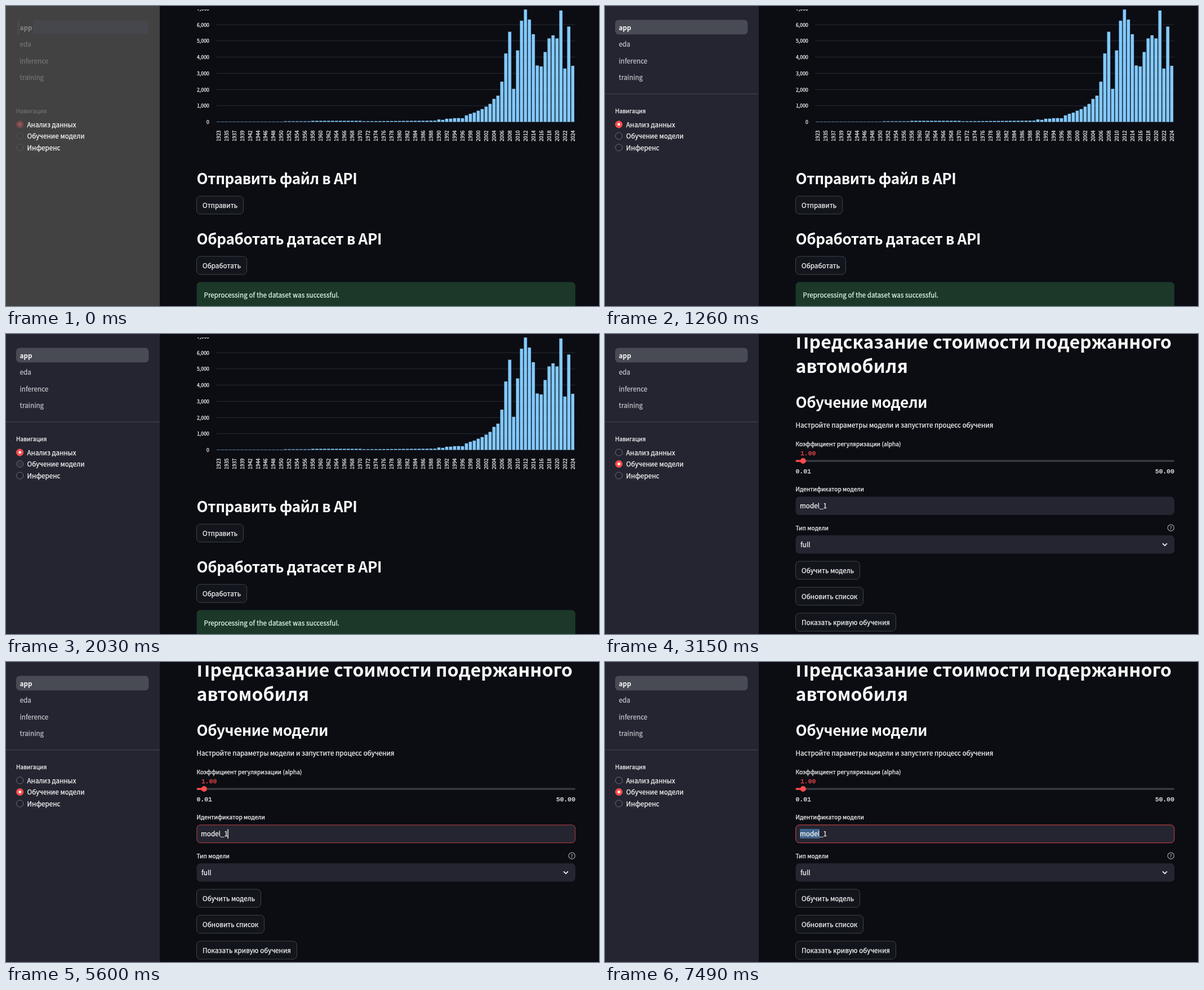
Animation, 1053 px wide and 532 px high, one loop 8000 ms. Source, as an HTML page:

```html
<!DOCTYPE html>
<html lang="en">
<head>
<meta charset="utf-8">
<title>Model dashboard</title>
<style>
html, body { margin: 0; width: 100%; height: 100%; overflow: hidden; background: #0b0d13; }
svg { display: block; width: 100vw; height: 100vh; }
text {
  font-family: "Noto Sans CJK JP", "Noto Sans CJK SC", "Noto Sans CJK", "Open Sans", sans-serif;
  color: #fafafa; fill: currentColor; stroke: currentColor; stroke-width: .25px;
  letter-spacing: .05px; white-space: pre;
}
.mono { font-family: "Liberation Mono", monospace; letter-spacing: 0; }
.h1 { font-weight: 700; letter-spacing: .08px; stroke: none; }
.h2 { font-weight: 600; letter-spacing: -.42px; stroke: none; }
.step { animation: 8s step-end infinite; }
.veil { animation-name: veil; }
.side { animation-name: side; }
.data { animation-name: data; }
.train { animation-name: train; }
.first { animation-name: first; }
.hover { animation-name: hover; }
.swap { animation-name: swap; }
.focus { animation-name: focus; }
.caret { animation-name: caret; }
.pick { animation-name: pick; }
@keyframes veil { 0% { opacity: 1 } 15.75%, 100% { opacity: 0 } }
@keyframes side { 0% { opacity: 0 } 15.75%, 100% { opacity: 1 } }
@keyframes data { 0% { opacity: 1 } 39.375%, 100% { opacity: 0 } }
@keyframes train { 0% { opacity: 0 } 39.375%, 100% { opacity: 1 } }
@keyframes first { 0% { opacity: 1 } 37.625%, 100% { opacity: 0 } }
@keyframes hover { 0% { opacity: 0 } 25.375% { opacity: 1 } 37.625%, 100% { opacity: 0 } }
@keyframes swap { 0% { opacity: 0 } 37.625% { opacity: 1 } 39.375%, 100% { opacity: 0 } }
@keyframes focus { 0% { opacity: 0 } 70% { opacity: .68 } 70.875% { opacity: .8 } 71.75%, 100% { opacity: .85 } }
@keyframes caret {
  0% { opacity: 0; transform: none }
  70% { opacity: 1 }
  77% { opacity: .7 } 77.875% { opacity: .3 } 78.75% { opacity: 0 }
  82.25% { opacity: .3 } 83.125% { opacity: .7 } 84% { opacity: 1; transform: none }
  89.25% { opacity: 1; transform: translateX(-13px) }
  91.875%, 100% { opacity: 0; transform: translateX(-13px) }
}
@keyframes pick {
  0% { opacity: 0; transform: none }
  91.875% { opacity: 1; transform: translateX(25px) }
  92.75% { opacity: 1; transform: translateX(10.8px) }
  93.625%, 100% { opacity: 1; transform: none }
}
</style>
</head>
<body>
<svg id="stage" viewBox="0 0 1053 532" preserveAspectRatio="none"></svg>
<script>
const BODY = 13, SMALL = 11.375, TICK = 9.75, H1 = 35.75, H2 = 29.25;
const CJK_SCALE = 1.117; // Latin letters of the CJK face run larger per em
const RED = '#ff4b4b', PANEL = '#242530', BG = '#0b0d13';

const text = (x, y, size, str, attrs = '') =>
  `<text x="${x}" y="${y}" font-size="${(size / CJK_SCALE).toFixed(3)}" ${attrs}>${str}</text>`;
const mono = (x, y, str, attrs = '') =>
  `<text class="mono" x="${x}" y="${y}" font-size="${SMALL}" ${attrs}>${str}</text>`;
const h1 = (y, str) => text(338.5, y, H1, str, 'class="h1"');
const h2 = (y, str) => text(338.5, y, H2, str, 'class="h2"');
const rect = (x, y, w, h, fill, attrs = '') =>
  `<rect x="${x}" y="${y}" width="${w}" height="${h}" fill="${fill}" ${attrs}/>`;
const disc = (y, r, fill, attrs = '') =>
  `<circle cx="24.6" cy="${y}" r="${r}" fill="${fill}" ${attrs}/>`;
const group = (cls, ...parts) => `<g class="${cls}">${parts.join('')}</g>`;
const button = (y, w, label) =>
  rect(338.5, y, w, 32, '#12151c', 'rx="6.5" stroke="#41434b"') + text(349, y + 20.6, BODY, label);
const ring = (y, stroke, fill) => disc(y, 6, fill, `stroke="${stroke}"`);
const radioOn = y => disc(y, 6.5, RED) + disc(y, 2.4, '#fff');

const RADIO_Y = [210, 230.5, 251];
const pages = ['app', 'eda', 'inference', 'training'];
const options = ['Анализ данных', 'Обучение модели', 'Инференс'];

function menu(active, rest) {
  return pages.map((p, i) => text(24.5, 42.5 + 29.5 * i, BODY, p,
    i ? `style="color:${rest}"` : `font-weight="600" style="color:${active};stroke:none"`)).join('');
}

function sidebar() {
  const heading = color => text(18, 190, SMALL, 'Навигация', `style="color:${color}"`);
  return rect(0, 0, 273, 532, PANEL) +
    group('step side',
      rect(18, 24.5, 235.5, 26, '#484a54', 'rx="6.5"'),
      menu('#fafafa', '#c3c4c9'),
      rect(0, 155.4, 273, 1, '#484a53'),
      heading('#fafafa'),
      RADIO_Y.map(y => ring(y, '#70727a', '#20212a')).join(''),
      group('step first', radioOn(RADIO_Y[0])),
      group('step hover', disc(RADIO_Y[1], 5.5, '#31323b')),
      group('step swap',
        disc(RADIO_Y[0], 6.5, '#a5686a') + disc(RADIO_Y[0], 5, '#857073'),
        disc(RADIO_Y[1], 6.5, '#f2565a') + disc(RADIO_Y[1], 4, '#c39b9f')),
      group('step train', radioOn(RADIO_Y[1]))) +
    group('step veil',
      rect(0, 0, 273, 532, '#424242'),
      rect(20, 26, 4, 23.5, '#494a4d') + rect(48, 26, 204.5, 23.5, '#46474d'),
      menu('#858585', '#747474'),
      heading('#6e6e6e'),
      RADIO_Y.slice(1).map(y => ring(y, '#575757', '#414141')).join(''),
      disc(RADIO_Y[0], 6.5, '#7c484a') + disc(RADIO_Y[0], 2.4, '#946466')) +
    options.map((o, i) => text(37.5, RADIO_Y[i] + 4.5, BODY, o)).join('');
}

// Counts for the last 35 years; the earlier ones barely leave the axis.
const recent = [150, 125, 195, 200, 230, 235, 225, 400, 500, 570, 690, 790, 940, 1110, 1420, 1620, 2480,
  4220, 5560, 2040, 4410, 6240, 6930, 6310, 5410, 3480, 3420, 4310, 5150, 5340, 5150, 6870, 3290, 5880, 3460];

function chart() {
  const count = 91, pitch = 6.99, zero = 205.5, unit = 28.75 / 1000;
  const firstRecent = count - recent.length;
  const early = i => i < 17 ? 18 : i < 24 ? 38 : i < 37 ? 65 : 40 + (i - 37) * 2;
  let out = '';
  for (let v = 0; v <= 7000; v += 1000) {
    const y = zero - v * unit;
    if (v < 7000) out += rect(373.5, y - .4, 637, 1, '#2b2d36');
    out += text(361, y + 3.6, TICK, v.toLocaleString('en-US'), 'text-anchor="end"');
  }
  for (let i = 0; i < count; i++) {
    const x = 377.2 + i * pitch;
    const h = (i < firstRecent ? early(i) : recent[i - firstRecent]) * unit;
    out += rect((x - 2.8).toFixed(2), (zero - h).toFixed(2), 5.6, h.toFixed(2), '#83c9ff');
    if (i % 2) continue;
    const year = i > 7 ? 1934 + i : i ? 1933 + i : 1923;
    out += text(0, 0, TICK, year,
      `text-anchor="end" transform="translate(${(x + 3.4).toFixed(2)} 220.5) rotate(-90)"`);
  }
  return out;
}

function dataPage() {
  return chart() +
    h2(316, 'Отправить файл в API') +
    button(337, 83, 'Отправить') +
    h2(423.3, 'Обработать датасет в API') +
    button(444, 89, 'Обработать') +
    rect(338.5, 489.5, 672.5, 60, '#1b3829', 'rx="6.5"') +
    text(351.5, 517.3, BODY, 'Preprocessing of the dataset was successful.', 'style="color:#e2fbe9"');
}

function trainPage() {
  return h1(25.7, 'Предсказание стоимости подержанного') +
    h1(68.6, 'автомобиля') +
    h2(131, 'Обучение модели') +
    text(338.5, 166.2, BODY, 'Настройте параметры модели и запустите процесс обучения') +
    text(338.5, 199, SMALL, 'Коэффициент регуляризации (alpha)') +
    mono(347, 215, '1.00', `style="color:${RED}"`) +
    rect(338.5, 223.4, 672.5, 3.3, '#3a3c44', 'rx="1.6"') +
    rect(338.5, 223.4, 13, 3.3, RED, 'rx="1.6"') +
    `<circle cx="351.8" cy="225" r="5" fill="${RED}"/>` +
    mono(338.5, 247.3, '0.01') +
    mono(1011, 247.3, '50.00', 'text-anchor="end"') +
    text(338.5, 279.2, SMALL, 'Идентификатор модели') +
    rect(338.5, 288.5, 672.5, 32.5, PANEL, 'rx="6.5"') +
    rect(338.8, 288.9, 672, 31.8, 'none', `rx="6.5" stroke="${RED}" class="step focus"`) +
    `<svg x="346" y="296" width="35" height="17" style="width:35px;height:17px">${
      rect(0, 0, 35, 17, '#3f638b', 'class="step pick"')}</svg>` +
    text(346, 309.3, BODY, 'model_1') +
    rect(393.4, 296.5, 1.4, 16.5, '#fafafa', 'class="step caret"') +
    text(338.5, 348, SMALL, 'Тип модели') +
    '<circle cx="1004.8" cy="343.7" r="5.6" fill="none" stroke="#a5a6aa" stroke-width="1.2"/>' +
    text(1004.8, 347, 9, '?', 'text-anchor="middle" style="color:#b5b6ba"') +
    rect(338.5, 357, 672.5, 32.5, PANEL, 'rx="6.5"') +
    text(347, 378, BODY, 'full') +
    '<path d="M990.2 371.4l3.9 3.9 3.9-3.9" fill="none" stroke="#fafafa" stroke-width="1.7"/>' +
    button(403, 114, 'Обучить модель') +
    button(449, 120, 'Обновить список') +
    button(495, 178, 'Показать кривую обучения');
}

document.getElementById('stage').innerHTML =
  '<clipPath id="view"><path d="M273 6H1053V532H273z"/></clipPath>' +
  rect(0, 0, 1053, 532, BG) +
  `<g clip-path="url(#view)">${group('step data', dataPage())}${group('step train', trainPage())}</g>` +
  sidebar();
</script>
</body>
</html>
```
